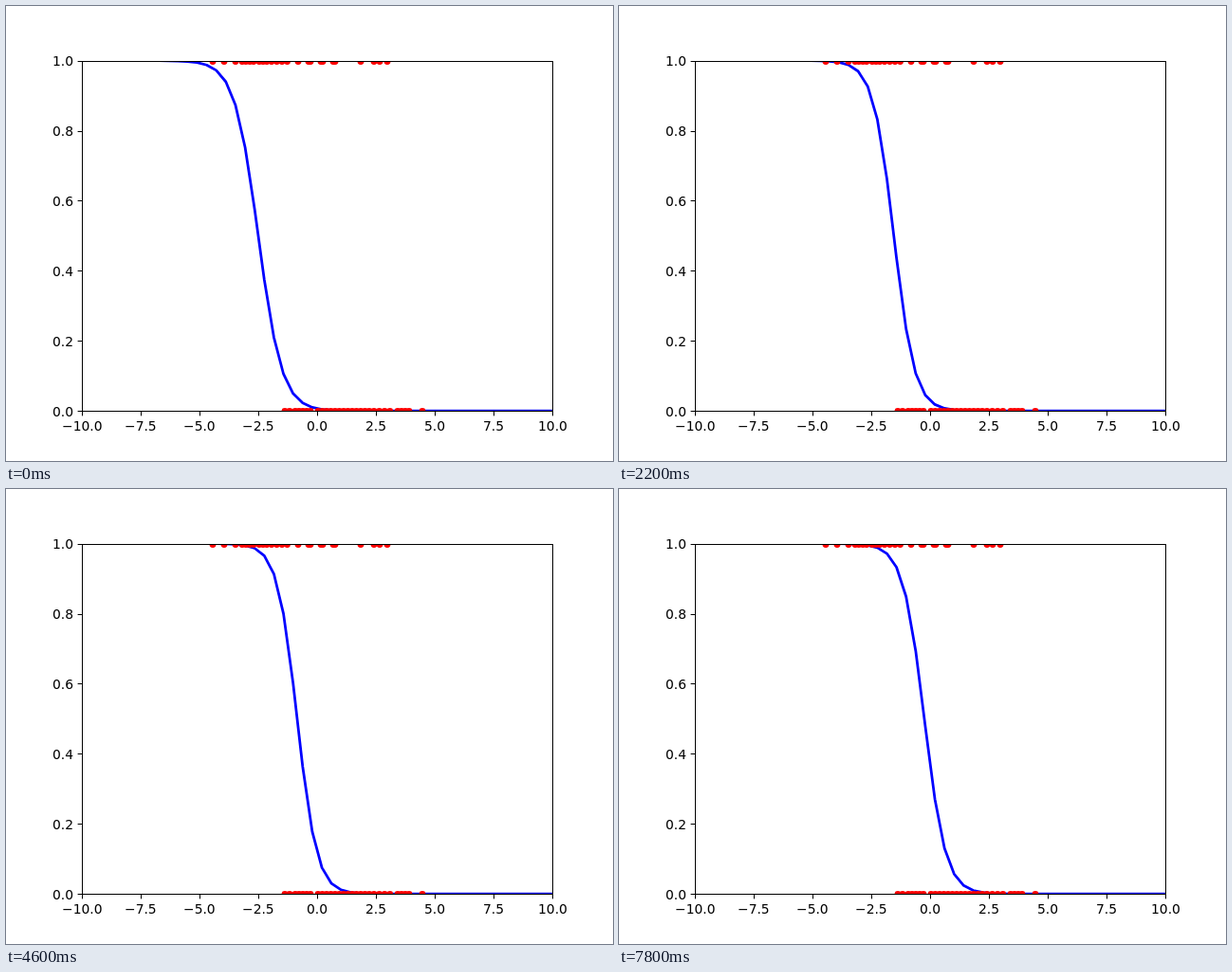
An HTML page that plays this animation: 640 px wide and 480 px high, repeating every 8 s.

```html
<!DOCTYPE html>
<html lang="en">
<head>
<meta charset="utf-8">
<title>Logistic fit</title>
<style>
  html, body { margin: 0; width: 100%; height: 100%; overflow: hidden; background: #fff; }
  svg { display: block; width: 640px; height: 480px; }
  text { font: 13.89px "DejaVu Sans", sans-serif; }
  .axis { fill: none; stroke: #000; }
  #curve { fill: none; stroke: #00f; stroke-width: 2.78; stroke-linejoin: round; }
  #dots { fill: #f00; }
</style>
</head>
<body>
<svg viewBox="0 0 640 480">
  <clipPath id="plot"><rect x="80" y="58" width="497" height="370"/></clipPath>
  <g clip-path="url(#plot)">
    <polyline id="curve"/>
    <g id="dots"></g>
  </g>
  <g id="ticks"></g>
  <rect class="axis" x="80.5" y="58.5" width="496" height="369"/>
</svg>
<script>
const LOOP = 8000, STEP = 200, SAMPLES = 50;
const toX = x => 328 + x * 24.8;
const toY = y => 427.2 - y * 369.6;
const byId = id => document.getElementById(id);

function add(parent, tag, attributes, text = '') {
  const node = document.createElementNS('http://www.w3.org/2000/svg', tag);
  for (const name in attributes) node.setAttribute(name, attributes[name]);
  node.textContent = text;
  byId(parent).append(node);
  return node;
}

// Places text on whole pixels; align is the share of its width left of x.
function addLabel(value, x, y, align) {
  const label = add('ticks', 'text', { y: Math.round(y) }, value.toFixed(1).replace('-', '\u2212'));
  label.setAttribute('x', Math.round(x - align * label.getComputedTextLength()));
}

// Each span is a run of evenly spaced dots: first, last, spacing.
function addDots(cy, spans) {
  for (const [first, last, spacing] of spans)
    for (let cx = first; cx <= last; cx += spacing) add('dots', 'circle', { cx, cy, r: 3.47 });
}

// Polynomial through the given [step, value] knots.
const through = knots => n => knots.reduce((sum, [a, value]) =>
  sum + knots.reduce((term, [b]) => b === a ? term : term * (n - b) / (a - b), value), 0);

const steepness = through([[0, 1.992], [7, 2.198], [23, 2.385], [39, 2.218]]);
const midpoint = through([[0, -2.502], [7, -1.842], [15, -1.279], [23, -0.848], [39, -0.243]]);

addDots(58.5, [[218, 242, 12], [249, 261, 4], [267, 275, 4], [280, 297, 5.5],
  [308, 347, 13], [319, 345, 13], [374, 402, 14], [394, 394, 1]]);
addDots(427.5, [[294, 299, 5], [305, 321, 4], [329, 383, 4.5], [388, 405, 5.6],
  [413, 425, 4], [439, 439, 1]]);

for (let value = -10; value <= 10; value += 2.5) {
  const x = toX(value);
  add('ticks', 'path', { class: 'axis', d: `M${x + 0.5} 427.5v4.9` });
  addLabel(value, x, 448, 0.5);
}
for (let i = 0; i <= 5; i++) {
  const y = toY(i / 5);
  add('ticks', 'path', { class: 'axis', d: `M80.5 ${Math.round(y) + 0.5}h-4.9` });
  addLabel(i / 5, 71.2, y + 5.4, 1);
}

function draw(now) {
  const n = Math.floor(now % LOOP / STEP);
  const w = steepness(n), c = midpoint(n);
  const points = Array.from({ length: SAMPLES }, (_, i) => {
    const x = -10 + 20 * i / (SAMPLES - 1);
    return [toX(x), toY(1 / (1 + Math.exp(w * (x - c))))];
  });
  byId('curve').setAttribute('points', points.join(' '));
}

function tick() {
  draw(performance.now());
  requestAnimationFrame(tick);
}
tick();
</script>
</body>
</html>
```
